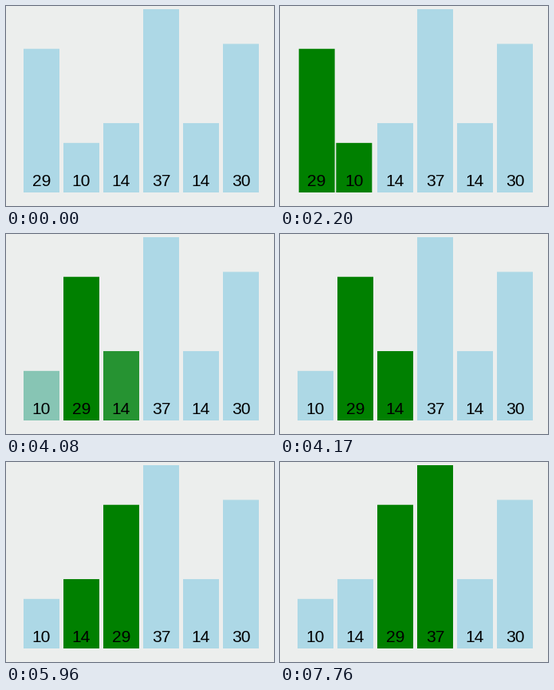
Animation, 336 px wide and 251 px high, one loop 8000 ms. Source, as a matplotlib script:

```python
import matplotlib.pyplot as plt
from matplotlib.animation import FuncAnimation
from matplotlib.patches import Rectangle

W, H, DPI = 336, 251, 64
LOOP, TICK = 8000, 10          # ms
STEP, DURATION = 90, 200       # ms between redraws, length of a transition
LEFT, PITCH, BAR_W, FLOOR = 22, 50, 45, 234
UNIT = 230 / 37                # pixels per value
BLUE, GREEN = (173, 216, 230), (0, 128, 0)
VALUES = [29, 10, 14, 37, 14, 30]

# (first redraw, moment the transition began, kind, bars)
EVENTS = [
    (500, 406, "mark", (0, 1)),
    (2200, 2190, "swap", (0, 1)),
    (4080, 3984, "mark", (0, 2)),
    (5780, 5763, "swap", (0, 2)),
    (7580, 7560, "mark", (0, 3)),
]


def ease(t):
    """CSS 'ease': cubic-bezier(.25, .1, .25, 1)."""
    if t >= 1:
        return 1.0
    lo, hi = 0.0, 1.0
    for _ in range(24):
        u = (lo + hi) / 2
        x = 0.75 * (1 - u) * u + u ** 3
        lo, hi = (u, hi) if x < t else (lo, u)
    return 0.3 * (1 - u) ** 2 * u + 3 * (1 - u) * u * u + u ** 3


def progress(now, first, start):
    shown = first + (now - first) // STEP * STEP
    return ease((shown - start) / DURATION)


def state(now):
    """Slot position and amount of green for every bar."""
    slots = [float(i) for i in range(len(VALUES))]
    greens = [0.0] * len(VALUES)
    for first, start, kind, bars in EVENTS:
        if now < first:
            break
        p = progress(now, first, start)
        if kind == "swap":
            a, b = bars
            sa, sb = slots[a], slots[b]
            slots[a], slots[b] = sa + (sb - sa) * p, sb + (sa - sb) * p
        else:
            greens = [g + ((i in bars) - g) * p for i, g in enumerate(greens)]
    return slots, greens


def blend(g):
    return tuple((b + (c - b) * g) / 255 for b, c in zip(BLUE, GREEN))


fig = plt.figure(figsize=(W / DPI, H / DPI), dpi=DPI, facecolor="#eceeed")
ax = fig.add_axes([0, 0, 1, 1])
ax.set_xlim(0, W)
ax.set_ylim(H, 0)
ax.axis("off")

rects, labels = [], []
for i, v in enumerate(VALUES):
    x = LEFT + PITCH * i
    rect = Rectangle((x, FLOOR - v * UNIT), BAR_W, v * UNIT,
                     facecolor=blend(0), linewidth=0, snap=False, zorder=1)
    rects.append(ax.add_patch(rect))
    labels.append(ax.text(x + BAR_W / 2, 226, str(v), ha="center", va="baseline",
                          family="Liberation Sans", fontsize=21 * 72 / DPI,
                          color="black", zorder=2))


def draw(frame):
    slots, greens = state(frame * TICK)
    for rect, label, slot, green in zip(rects, labels, slots, greens):
        x = LEFT + PITCH * slot
        rect.set_x(x)
        rect.set_facecolor(blend(green))
        label.set_x(x + BAR_W / 2)
    return rects + labels


anim = FuncAnimation(fig, draw, frames=LOOP // TICK, interval=TICK,
                     repeat=True, repeat_delay=0, blit=False)
plt.show()
```
